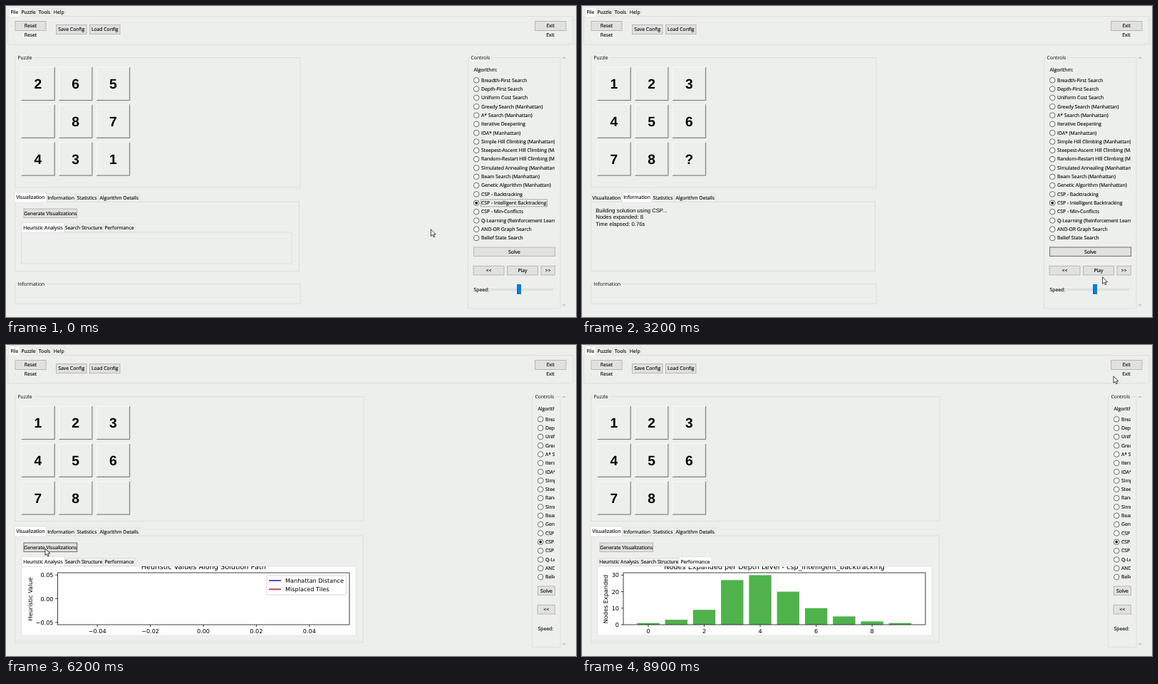
These frames come from a looping animation (800 px wide and 437 px high, 9000 ms). An HTML page:

```html
<!DOCTYPE html>
<html lang="en">
<head>
<meta charset="utf-8">
<title>Puzzle solver</title>
<style>
html, body { margin: 0; width: 100%; height: 100%; overflow: hidden; background: #edefec; }
svg { display: block; width: 800px; height: 437px; }
text { font: 6.8px "Open Sans", "Noto Sans", sans-serif; fill: #000; stroke: #000; stroke-width: .12px; text-rendering: geometricPrecision; white-space: pre; }
.title { paint-order: stroke; stroke: #edefec; stroke-width: 4px; }
.tile { font: bold 19.2px "Liberation Sans", Arial, sans-serif; stroke: none; }
.log { font: 7.72px "Liberation Sans", Arial, sans-serif; stroke: none; }
.plot { font: 8.14px "DejaVu Sans", sans-serif; stroke: none; }
.plot.head { font-size: 9.7px; }
</style>
</head>
<body>
<svg viewBox="0 0 800 437">
  <defs>
    <clipPath id="controlsClip"><rect x="640" y="60" width="130" height="377"/></clipPath>
    <clipPath id="plotClip"><rect x="21.5" y="311" width="469.5" height="97"/></clipPath>
  </defs>
  <g id="scene"></g>
  <path id="cursor" d="M0 0V9.6L2.2 7.5 3.8 11 5.3 10.3 3.8 7H6.8Z" fill="#fff" stroke="#111" stroke-width=".8"/>
</svg>
<script>
const LOOP = 9000, TICK = 100;
const BG = '#edefec', EDGE = '#dcdedb';
const SOLVE_START = 2440, STEP_MS = 108, SOLVE_END = SOLVE_START + 9 * STEP_MS;
const OPEN_INFO = 1000, OPEN_VISUAL = 4900, SHOW_PLOT = 6100, OPEN_TREE = 6900, OPEN_PERF = 7600;
const START_TILES = [2, 6, 5, '', 8, 7, 4, 3, 1];
const GOAL_TILES = [1, 2, 3, 4, 5, 6, 7, 8, ''];
const ALGORITHMS = [
  'Breadth-First Search', 'Depth-First Search', 'Uniform Cost Search', 'Greedy Search (Manhattan)',
  'A* Search (Manhattan)', 'Iterative Deepening', 'IDA* (Manhattan)', 'Simple Hill Climbing (Manhattan)',
  'Steepest-Ascent Hill Climbing (Manhattan)', 'Random-Restart Hill Climbing (Manhattan)',
  'Simulated Annealing (Manhattan)', 'Beam Search (Manhattan)', 'Genetic Algorithm (Manhattan)',
  'CSP - Backtracking', 'CSP - Intelligent Backtracking', 'CSP - Min-Conflicts',
  'Q-Learning (Reinforcement Learning)', 'AND-OR Graph Search', 'Belief State Search'
];
const NODES_PER_DEPTH = [1, 3, 9, 27, 30, 20, 10, 5, 2, 1];
// Pointer path: time, x, y
const POINTER = [
  [0, 596.4, 313.8], [150, 596.4, 313.8], [850, 78, 267], [1250, 78, 267], [2050, 677.5, 348], [2500, 677.5, 348],
  [3100, 730.6, 380.8], [3900, 730.6, 380.8], [4600, 438.2, 261.8], [4900, 36, 267], [5150, 36, 267], [5500, 55, 286],
  [6250, 55, 286], [6650, 118.8, 307], [7000, 118.8, 307], [7450, 158, 305], [8150, 158, 305], [8900, 746, 43.8]
];

const rect = (x1, y1, x2, y2, fill = 'none', stroke = 'none', extra = '') =>
  `<rect x="${x1}" y="${y1}" width="${x2 - x1}" height="${y2 - y1}" fill="${fill}" stroke="${stroke}" ${extra}/>`;
const path = (d, stroke, width = 1, extra = '') =>
  `<path d="${d}" fill="none" stroke="${stroke}" stroke-width="${width}" ${extra}/>`;
const text = (s, x, y, cls = '', anchor = 'start', extra = '') =>
  `<text x="${x}" y="${y}" class="${cls}" text-anchor="${anchor}" ${extra}>${String(s).replace(/</g, '&lt;')}</text>`;
const label = (s, x, y, cls, anchor) => text(s, x, y + 2.3, cls, anchor);
const focusRing = (x1, y1, x2, y2) => rect(x1, y1, x2, y2, 'none', '#444', 'stroke-width=".7" stroke-dasharray=".8 .6"');
const groupBox = (s, x1, y1, x2, y2) => rect(x1, y1, x2, y2, 'none', EDGE) + label(s, x1 + 4, y1, 'title');

const BUTTON = {
  normal: ['#e1e1e0', '#adadad', .8], hover: ['#e3f0f9', '#2f87c8', 1],
  pressed: ['#c9e1f2', '#1c5f94', 1.2], focus: ['#e1e1e0', '#777', 1.1]
};
function button(s, x1, y1, x2, y2, look = 'normal') {
  const [fill, stroke, width] = BUTTON[look];
  return rect(x1, y1, x2, y2, fill, stroke, `stroke-width="${width}"`) + label(s, (x1 + x2) / 2, (y1 + y2) / 2, '', 'middle');
}

// Each tab: [caption, left, right]; the pane's top edge is y.
function tabs(list, y, selected, hovered = -1, focused = false) {
  return list.map(([s, x1, x2], i) => {
    const on = i === selected;
    return rect(x1 - on, y - (on ? 13 : 11), x2 + on, y + (on ? 1 : 0),
      on ? '#fdfefd' : i === hovered ? '#d8e9f4' : BG, EDGE, 'stroke-width=".7"') +
      label(s, (x1 + x2) / 2, y - (on ? 6.2 : 5.6), '', 'middle') +
      (on && focused ? focusRing(x1 + .5, y - 11, x2 - .5, y - .5) : '');
  }).join('');
}

function toolbar() {
  return rect(2.5, 14.5, 796, 54, 'none', EDGE) +
    tabs([['File', 5, 19], ['Puzzle', 20, 43], ['Tools', 43, 65], ['Help', 65, 83.4]], 14.5, 0) +
    button('Reset', 13, 21.5, 56, 34.5) + label('Reset', 34.5, 41, '', 'middle') +
    button('Save Config', 70.5, 26.5, 113, 39.5) + button('Load Config', 117.5, 26.5, 160, 39.5) +
    button('Exit', 742.5, 21.5, 786, 34.5) + label('Exit', 764, 41, '', 'middle');
}

function board(tiles) {
  return tiles.map((value, i) => {
    const x = 21.7 + (i % 3) * 52.7, y = 86 + Math.floor(i / 3) * 52.8, s = 46.6;
    return path(`M${x} ${y + s}V${y}H${x + s}`, '#f9faf8') +
      path(`M${x + 1} ${y + s - .9}H${x + s - .9}V${y + 1}`, '#d3d5d2', .8) +
      path(`M${x} ${y + s}H${x + s}V${y}`, '#6c6c6c', .9) +
      text(value, x + 23.2, y + 30.3, 'tile', 'middle');
  }).join('');
}

function controls(t, wide) {
  const dx = wide ? 90 : 0, x = 656 + dx;
  const solveLook = t >= 2050 && t < 2400 ? 'hover' : t >= 2400 && t < OPEN_VISUAL ? 'focus' : 'normal';
  let body = label('Algorithm:', x + .5, 90);
  ALGORITHMS.forEach((name, i) => {
    const y = 104.3 + i * 12.32;
    body += `<circle cx="${x + 4.2}" cy="${y}" r="3.8" fill="#fff" stroke="#444" stroke-width=".8"/>`;
    if (i === 14) body += `<circle cx="${x + 4.2}" cy="${y}" r="2" fill="#222"/>`;
    body += label(name, x + 11, y);
  });
  if (t < OPEN_INFO) body += focusRing(666.5, 271.8, 759.5, 281.8);
  body += label('Speed:', x + .5, 398.3);
  let out = groupBox('Controls', 648.5 + dx, 72.5, 778, 425) + `<g clip-path="url(#controlsClip)">${body}</g>` +
    button('Solve', x + .5, 339, 770.5, 351.5, solveLook) +
    button('<<', x, 365.3, wide ? 770.5 : 699, 378);
  if (!wide) {
    out += button('Play', 703.5, 365.3, 746.5, 378) + button('>>', 751, 365.3, 770.5, 378) +
      rect(681, 397.3, 768, 399.3, '#e5e6e4', '#d2d4d1', 'stroke-width=".6"') + rect(717, 391, 723, 405, '#0c7bd4');
  }
  return out + path('M781 74L783.2 71.8 785.4 74M781 419L783.2 421.2 785.4 419', '#999', .9);
}

function axes(left, xTicks, yTicks, title, yName) {
  let d = '', out = '';
  for (const [s, x] of xTicks) {
    d += `M${x} 393v3.2`;
    out += text(s, x, 405, 'plot', 'middle');
  }
  for (const [s, y] of yTicks) {
    d += `M${left} ${y}h-3.2`;
    out += text(s, left - 6, y + 3, 'plot', 'end');
  }
  const nameX = left === 58 ? 36 : 36.5;
  return rect(left, 320, 482, 393, 'none', '#111', 'stroke-width=".8"') + path(d, '#111', .8) + out +
    text(title, (left + 482) / 2, 314.8, 'plot head', 'middle') +
    text(yName, nameX, 357, 'plot', 'middle', `transform="rotate(-90 ${nameX} 357)"`);
}

function heuristicPlot() {
  const xTicks = [-2, -1, 0, 1, 2].map(k => [(k < 0 ? '−' : '') + (Math.abs(k) * .02).toFixed(2), 277 + k * 74.4]);
  return axes(72.5, xTicks, [['0.05', 323.2], ['0.00', 356.5], ['−0.05', 389.8]],
    'Heuristic Values Along Solution Path', 'Heuristic Value') +
    rect(366, 324, 477.5, 351, '#fff', '#ccc', 'rx="1.6" stroke-width=".8"') +
    path('M369 331H386', '#1616f0', 1.5) + path('M369 343.3H386', '#b84a62', 2) +
    text('Manhattan Distance', 392, 334, 'plot') + text('Misplaced Tiles', 392, 346.3, 'plot');
}

function performancePlot() {
  const at = i => 93 + i * 39.27, height = n => 393 - n * 2.32;
  return NODES_PER_DEPTH.map((n, i) => rect(at(i) - 15.7, height(n), at(i) + 15.7, 393, '#50b24c')).join('') +
    axes(58, [0, 2, 4, 6, 8].map(i => [i, at(i)]), [0, 10, 20, 30].map(n => [n, height(n)]),
      'Nodes Expanded per Depth Level - csp_intelligent_backtracking', 'Nodes Expanded');
}

function visualization(t, wide, top) {
  const selected = t >= OPEN_PERF ? 2 : t >= OPEN_TREE ? 1 : 0;
  const look = t >= 5600 && t < SHOW_PLOT ? 'pressed' : wide && t < OPEN_TREE ? 'focus' : 'normal';
  const hovered = t >= 6600 && t < OPEN_TREE ? 1 : t >= 7350 && t < OPEN_PERF ? 2 : -1;
  let out = button('Generate Visualizations', 25, top + 10, 99.7, top + 22.5, look);
  if (wide) {
    out += rect(21.5, 311, 491, 408, '#fefefe', EDGE, 'stroke-width=".7"') +
      `<g clip-path="url(#plotClip)">${[heuristicPlot, () => '', performancePlot][selected]()}</g>`;
  } else {
    out += rect(21.5, 318, 401, 362, 'none', EDGE);
  }
  return out + tabs([['Heuristic Analysis', 23, 81], ['Search Structure', 82, 136], ['Performance', 137, 181]],
    top + 42.5, selected, hovered);
}

function logLines(t, step) {
  if (t < SOLVE_START) return ['Ready to solve'];
  if (t < SOLVE_END) {
    return ['Building solution using CSP...', `Nodes expanded: ${step}`, `Time elapsed: ${((step - 1) * .108).toFixed(2)}s`];
  }
  return ['Algorithm: CSP - Intelligent Backtracking', 'Solution found in 0 steps',
    'Time taken: 0.973426 seconds', 'Nodes expanded: 9', 'Max queue size: 1'];
}

function scene(t) {
  const wide = t >= SHOW_PLOT, info = t >= OPEN_INFO && t < OPEN_VISUAL;
  const top = wide ? 268 : 275;
  const step = Math.floor((t - SOLVE_START) / STEP_MS) + 1;
  const tiles = t < SOLVE_START ? START_TILES
    : GOAL_TILES.map((v, i) => t < SOLVE_END && i >= step ? '?' : v);
  let out = toolbar() + groupBox('Puzzle', 12.5, 72.5, wide ? 502 : 413, wide ? 247.5 : 255) + board(tiles) +
    rect(12.5, top, wide ? 501 : 411.5, wide ? 418 : 373, 'none', EDGE) +
    tabs([['Visualization', 13, 56], ['Information', 57, 97], ['Statistics', 98, 129], ['Algorithm Details', 130, 187.5]],
      top, info ? 1 : 0, -1, info && t < 2400);
  out += info ? logLines(t, step).map((s, i) => text(s, 19.2, 289.6 + i * 9.45, 'log')).join('') : visualization(t, wide, top);
  if (!wide) {
    out += groupBox('Information', 12.5, 390.5, 413, 418.5);
    if (t >= SOLVE_END) out += label('Step: 0/0', 20, 407);
  }
  return out + controls(t, wide);
}

function pointerAt(t) {
  const next = POINTER.findIndex(p => p[0] > t);
  if (next < 0) return POINTER[POINTER.length - 1].slice(1);
  const [t0, x0, y0] = POINTER[next - 1], [t1, x1, y1] = POINTER[next];
  const k = (t - t0) / (t1 - t0);
  return [x0 + (x1 - x0) * k, y0 + (y1 - y0) * k];
}

const sceneNode = document.getElementById('scene');
const cursorNode = document.getElementById('cursor');
let shown = '';
function render(t) {
  const markup = scene(t);
  if (markup !== shown) sceneNode.innerHTML = shown = markup;
  cursorNode.setAttribute('transform', `translate(${pointerAt(t)})`);
}

const start = performance.now();
function frame() {
  const t = (performance.now() - start) % LOOP;
  render(Math.floor(t / TICK) * TICK);
  requestAnimationFrame(frame);
}
frame();
</script>
</body>
</html>
```
